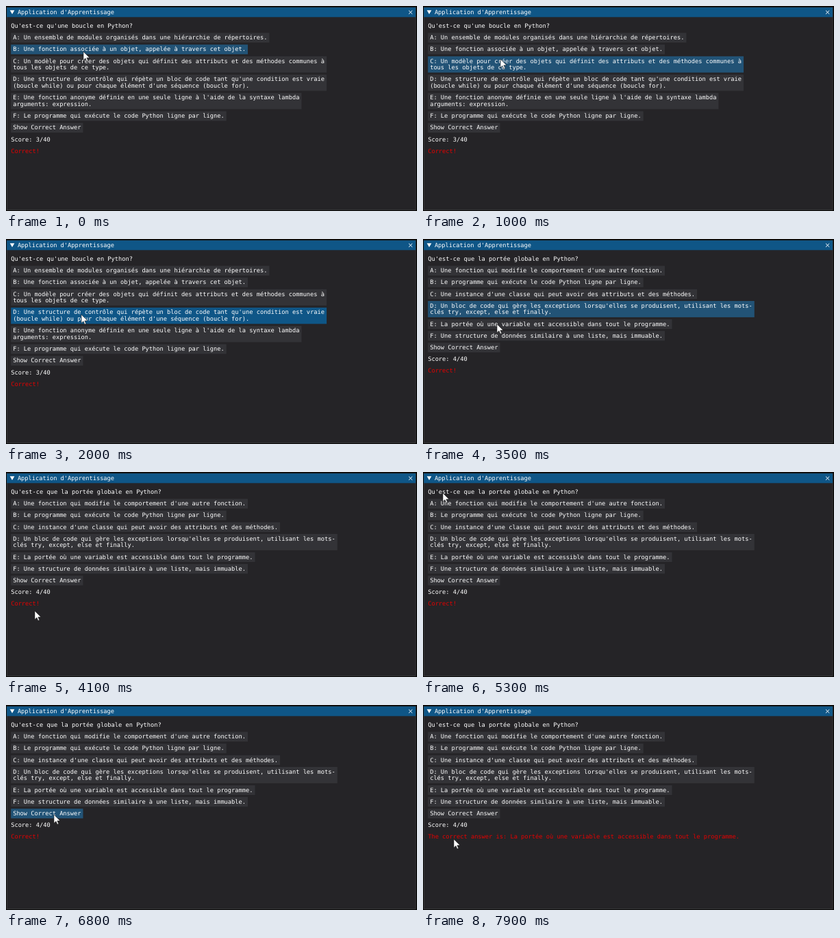
An HTML page for the animation above (8 s loop, 600 px wide and 301 px high).

```html
<!DOCTYPE html>
<html lang="fr">
<head>
<meta charset="utf-8">
<title>Application d'Apprentissage</title>
<style>
  html, body { margin: 0; width: 100%; height: 100%; overflow: hidden; background: #080808; }
  svg { display: block; width: 600px; height: 301px; }
  text {
    font: 11.63px "DejaVu Sans Mono", monospace;
    fill: #fff;
    text-rendering: geometricPrecision;
  }
  .message { fill: #e60000; }
</style>
</head>
<body>
<svg viewBox="0 0 600 301">
  <g transform="translate(1.2 2.1) scale(.747)">
    <rect width="799" height="398" fill="#252427" stroke="#4e4e4e" stroke-width=".8"/>
    <rect width="799" height="19" fill="#0f5687"/>
    <path d="M6 5.6H15L10.5 13.4Z" fill="#fff"/>
    <text x="21" y="13">Application d'Apprentissage</text>
    <path d="M785.5 6l7 7m0-7l-7 7" stroke="#fff" stroke-width="1.3"/>
    <g id="content"></g>
  </g>
  <path id="pointer" d="M0 0V16.5L4 13L6.5 19L9 18L6.5 12H12Z" fill="#fff" stroke="#111" stroke-width=".7"/>
</svg>
<script>
const LOOP = 8000, STEP = 100;
const CHAR = 7, LINE = 13, PAD_X = 4, PAD_Y = 3, GAP = 4, LEFT = 8, TOP = 27, BASE = 10;
const COLORS = { idle: "#333337", hover: "#225376", active: "#0f5687" };
const SHOW = 6, SWAP_AT = 2200, REVEAL_AT = 7200;

// "|" marks a line break inside a button
const quiz = [
  {
    question: "Qu'est-ce qu'une boucle en Python?",
    score: "Score: 3/40",
    answers: [
      "A: Un ensemble de modules organisés dans une hiérarchie de répertoires.",
      "B: Une fonction associée à un objet, appelée à travers cet objet.",
      "C: Un modèle pour créer des objets qui définit des attributs et des méthodes communes à|tous les objets de ce type.",
      "D: Une structure de contrôle qui répète un bloc de code tant qu'une condition est vraie|(boucle while) ou pour chaque élément d'une séquence (boucle for).",
      "E: Une fonction anonyme définie en une seule ligne à l'aide de la syntaxe lambda|arguments: expression.",
      "F: Le programme qui exécute le code Python ligne par ligne."
    ]
  },
  {
    question: "Qu'est-ce que la portée globale en Python?",
    score: "Score: 4/40",
    answers: [
      "A: Une fonction qui modifie le comportement d'une autre fonction.",
      "B: Le programme qui exécute le code Python ligne par ligne.",
      "C: Une instance d'une classe qui peut avoir des attributs et des méthodes.",
      "D: Un bloc de code qui gère les exceptions lorsqu'elles se produisent, utilisant les mots-|clés try, except, else et finally.",
      "E: La portée où une variable est accessible dans tout le programme.",
      "F: Une structure de données similaire à une liste, mais immuable."
    ]
  }
];
const REVEAL = "The correct answer is: La portée où une variable est accessible dans tout le programme.";

// [time, x, y] of the pointer tip
const path = [
  [0, 113, 67], [900, 113, 67], [1000, 113, 78], [1200, 112, 100], [1400, 111, 108],
  [1800, 110, 111], [3400, 110, 111], [3500, 108, 125], [3700, 88, 162], [4100, 42, 204],
  [4800, 42, 204], [5000, 37, 160], [5200, 31, 57], [5300, 29, 31], [5400, 29, 31],
  [6000, 228, 33], [6200, 228, 33], [6300, 205, 50], [6500, 140, 108], [6800, 70, 161],
  [7200, 70, 161], [7500, 28, 202], [7700, 3, 202], [7800, 5, 202], [7900, 45, 197]
];

// [time, button, state]
const hovers = [
  [0, 1, "hover"], [1000, 2, "hover"], [1200, -1], [1300, 3, "hover"], [1900, 3, "active"],
  [2200, 3, "hover"], [3600, 5, "hover"], [3700, SHOW, "hover"], [3800, -1],
  [5000, SHOW, "hover"], [5100, 3, "hover"], [5200, 1, "hover"], [5300, -1],
  [6300, 0, "hover"], [6400, 2, "hover"], [6500, 3, "hover"], [6600, 4, "hover"],
  [6700, 5, "hover"], [6800, SHOW, "hover"], [7000, SHOW, "active"],
  [REVEAL_AT, SHOW, "hover"], [7300, -1]
];

const content = document.getElementById("content");
const pointer = document.getElementById("pointer");
let shown = "";

const latest = (list, t) => list.findLast(item => item[0] <= t);

const label = (str, x, y, cls = "") =>
  `<text class="${cls}" x="${x}" y="${y + PAD_Y + BASE}">${str}</text>`;

function button(str, y, state) {
  const lines = str.split("|");
  const width = Math.max(...lines.map(s => s.length)) * CHAR + 2 * PAD_X;
  const height = lines.length * LINE + 2 * PAD_Y;
  const svg = `<rect x="${LEFT}" y="${y}" width="${width}" height="${height}" fill="${COLORS[state]}"/>` +
    lines.map((s, i) => label(s, LEFT + PAD_X, y + i * LINE)).join("");
  return { svg, height };
}

function page({ question, score, answers }, message, target, state) {
  const row = LINE + 2 * PAD_Y + GAP;
  let y = TOP, svg = label(question, LEFT, y);
  y += row;
  [...answers, "Show Correct Answer"].forEach((str, i) => {
    const b = button(str, y, i === target ? state : "idle");
    svg += b.svg;
    y += b.height + GAP;
  });
  return svg + label(score, LEFT, y) + label(message, LEFT, y + row, "message");
}

function position(t) {
  const a = latest(path, t);
  const b = path[path.indexOf(a) + 1] || a;
  const k = a === b ? 0 : (t - a[0]) / (b[0] - a[0]);
  return [1, 2].map(i => a[i] + (b[i] - a[i]) * k);
}

function draw(time) {
  const t = Math.floor((time % LOOP) / STEP) * STEP;
  const [, target, state] = latest(hovers, t);
  const index = t < SWAP_AT ? 0 : 1;
  const message = t < REVEAL_AT ? "Correct!" : REVEAL;
  const key = [index, message, target, state].join();
  if (key !== shown) {
    content.innerHTML = page(quiz[index], message, target, state);
    shown = key;
  }
  const [x, y] = position(t);
  pointer.setAttribute("transform", `translate(${x} ${y}) scale(.75)`);
}

const start = performance.now();
function tick() {
  draw(performance.now() - start);
  requestAnimationFrame(tick);
}
tick();
</script>
</body>
</html>
```
